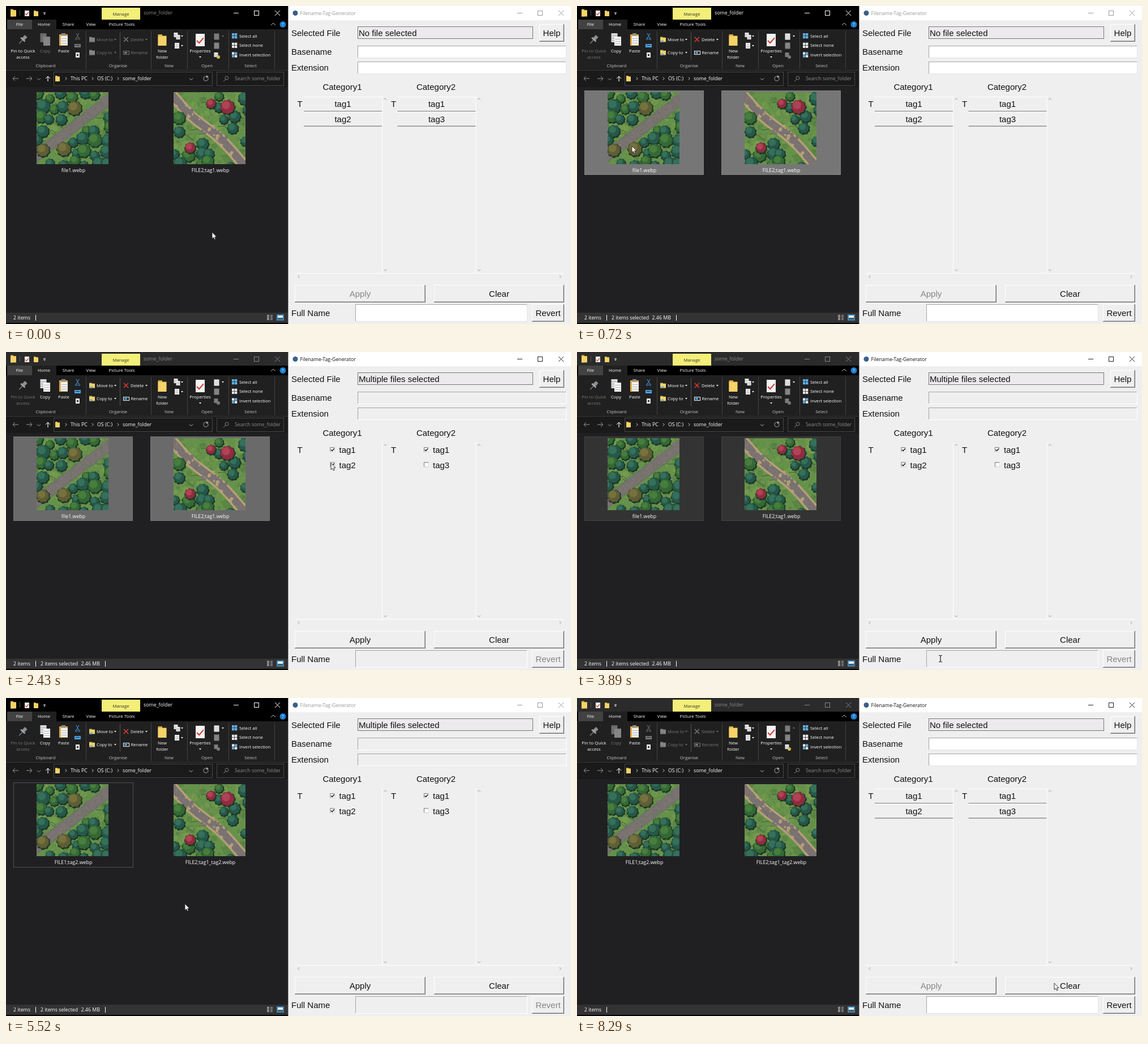
These frames come from a looping animation (998 by 561 pixels, 8320 ms). An HTML page with a canvas:

```html
<!DOCTYPE html>
<html lang="en">
<head>
<meta charset="utf-8">
<title>Filename-Tag-Generator</title>
<style>
html, body { margin: 0; width: 100%; height: 100%; overflow: hidden; background: #000; }
canvas { display: block; }
</style>
</head>
<body>
<canvas id="stage" width="998" height="561"></canvas>
<script>
const LOOP = 8320;
const UI = '"Open Sans", sans-serif', ARIAL = '"Liberation Sans", Arial, sans-serif';
// Moments of the story, in ms
const PRESS = 60, BAND_END = 650, DROP = 1730, TICK = 2370, APPLY = 4400, RENAME = 4790, DESELECT = 5440, CLEAR = 7720;
let g = document.getElementById('stage').getContext('2d');

// Drawing helpers
function rect(x, y, w, h, color) { g.fillStyle = color; g.fillRect(x, y, w, h); }
function frame(x, y, w, h, color) {
  g.strokeStyle = color; g.lineWidth = 1;
  g.strokeRect(Math.round(x) + .5, Math.round(y) + .5, Math.round(w) - 1, Math.round(h) - 1);
}
function trace(points) {
  g.beginPath();
  for (let i = 0; i < points.length; i += 2) g.lineTo(points[i], points[i + 1]);
}
function line(color, width, ...points) {
  g.strokeStyle = color; g.lineWidth = width;
  trace(points); g.stroke();
}
function poly(color, ...points) { g.fillStyle = color; trace(points); g.fill(); }
function disc(x, y, r, color) {
  g.fillStyle = color;
  g.beginPath(); g.arc(x, y, r, 0, 7); g.fill();
}
function ring(x, y, r, color, end = 7) {
  g.strokeStyle = color; g.lineWidth = 1;
  g.beginPath(); g.arc(x, y, r, -.3, end); g.stroke();
}
function cross(x, y, r, color, width = 1) {
  line(color, width, x - r, y - r, x + r, y + r);
  line(color, width, x + r, y - r, x - r, y + r);
}
const tick = (x, y, s, color, width) => line(color, width, x - s, y, x - s * .3, y + s * .7, x + s, y - s * .8);
// y is the middle of the capitals
function text(s, x, y, color = '#fff', size = 8.8, align = 'left', font = UI) {
  g.font = size + 'px ' + font;
  g.textAlign = align; g.fillStyle = color;
  g.fillText(s, x, y + size * .36);
}
const small = (s, x, y, color, align) => text(s, x, y, color, 7.75, align);
const caption = (s, x, y, color) => small(s, x, y, color, 'center');
const arial = (s, x, y, color = '#111', align = 'left') => text(s, x, y, color, 15, align, ARIAL);
function chevron(x, y, turns, size, color) {
  g.save(); g.translate(x, y); g.rotate(turns * Math.PI / 2);
  line(color, 1, -size / 2, -size, size / 2, 0, -size / 2, size);
  g.restore();
}
const caret = (x, y, color) => poly(color, x - 2, y - 1, x + 2, y - 1, x, y + 1.5);
function folder(x, y, w, h, color = '#f5d367', tab = '#d9a93c') {
  rect(x - w / 2, y - h / 2, w / 2, h, tab);
  rect(x - w / 2, y - h * .37, w, h * .87, color);
}
function page(x, y, w, h, color = '#f2f2f2') {
  rect(x - w / 2, y - h / 2, w, h, color);
  for (let i = 1; i < 4; i++) rect(x - w / 2 + 1, y - h / 2 + h * i / 4, w - 2, .6, '#8d8d8d');
}
function windowButtons(x, color) {
  line(color, 1, x - 4, 12.5, x + 5, 12.5);
  frame(x + 32, 8, 9, 9, color);
  cross(x + 73.5, 12.5, 4.5, color);
}

// Thumbnails: small forest maps with a road y = road(x)
function seeded(s) { return () => (s = s * 16807 % 2147483647) / 2147483647; }
const LEAVES = { teal: ['#26584a', '#35705a'], green: ['#346835', '#477d3d'], olive: ['#5f5d33', '#75723f'], red: ['#8f2c40', '#b04255'] };
function blob(x, y, r, color) {
  g.fillStyle = color; g.beginPath();
  for (let a = 0; a < 6.28; a += .16) {
    const q = r * (1 + .07 * Math.sin(a * 9 + x));
    g.lineTo(x + q * Math.cos(a), y + q * Math.sin(a));
  }
  g.fill();
}
function tree(x, y, r, kind) {
  const [dark, light] = LEAVES[kind];
  blob(x + .8, y + 1.2, r + 1.3, '#1b3527');
  blob(x, y, r, dark);
  blob(x - r * .2, y - r * .25, r * .6, light);
}
function makeMap({ seed, road, verge, density, accents }) {
  const canvas = document.createElement('canvas'), main = g, rnd = seeded(seed), spot = () => rnd() * 127;
  canvas.width = canvas.height = 127;
  g = canvas.getContext('2d');
  rect(0, 0, 127, 127, '#66914a');
  for (let i = 0; i < 90; i++) disc(spot(), spot(), 2 + rnd() * 6, i % 2 ? '#7ca24f80' : '#507a4080');
  for (let i = 0; i < 10; i++) {
    const x = spot(), y = spot();
    line('#3f5c35', 1, x, y, x + 12, y - 3 * rnd(), x + 22, y + 10 * rnd(), x + 34, y + 16 * rnd());
  }
  const route = [];
  for (let x = -8; x < 136; x += 4) route.push(x, road(x));
  line(verge, 20, ...route);
  line('#7b7272', 13, ...route);
  for (let i = 0; i < 45; i++) {
    const x = spot();
    disc(x, road(x) + (rnd() - .5) * 26, 1 + rnd() * 2.5, i % 2 ? verge : '#7b7272');
  }
  for (let i = 0; i < 400; i++) rect(spot(), spot(), 1, 1, i % 2 ? '#c0c07a70' : '#26382870');
  // jittered grid, kept clear of the road
  for (let row = 0; row < 7; row++) for (let col = 0; col < 7; col++) {
    const x = col * 20 + rnd() * 12, y = row * 20 + rnd() * 12, r = 7 + rnd() * 5, grows = rnd() < density;
    if (grows && Math.abs(y - road(x)) > 24) tree(x, y, r, rnd() < .75 ? 'teal' : 'green');
  }
  for (const [x, y, r, kind] of accents) tree(x, y, r, kind);
  g = main;
  return canvas;
}
const maps = [
  makeMap({ seed: 11, road: x => 112 - .77 * x, verge: '#6e7565', density: .95,
    accents: [[67, 28, 12, 'olive'], [48, 100, 12, 'olive'], [11, 102, 11, 'olive']] }),
  makeMap({ seed: 29, road: x => 8 + .95 * x + 4 * Math.sin(x / 18), verge: '#b5a077', density: .6,
    accents: [[66, 20, 8, 'red'], [95, 26, 12, 'red'], [29, 98, 9, 'red']] })
];

// Pointer stops: where, arrival, departure
const STOPS = [
  [364, 399, 0, PRESS], [97, 247, BAND_END, 870], [704, 352, 1650, DROP], [574, 196, TICK, 2840], [640, 246, 3230, 3530],
  [642, 541, 3860, 3950], [608, 503, 4340, RENAME], [316, 363, DESELECT, 6180], [843, 503, 7600, LOOP]
];
function pointerAt(t) {
  const i = STOPS.findIndex(stop => t <= stop[3]), [x, y, arrive] = STOPS[i];
  if (t >= arrive) return [x, y];
  const [x0, y0, , leave] = STOPS[i - 1], left = (1 - (t - leave) / (arrive - leave)) ** 2;
  return [x + (x0 - x) * left, y + (y0 - y) * left];
}

function drawRibbon(on) {
  const dim = '#777', lit = on ? '#fff' : dim, blue = on ? '#4aa3e8' : dim, red = on ? '#e03a32' : dim;
  rect(0, 41, 498, 73, '#202021');
  for (const x of [141, 256, 320, 393, 474]) rect(x, 44, 1, 67, '#434343');
  rect(201, 46, 1, 49, '#555');

  // Clipboard
  g.save(); g.translate(30, 59); g.rotate(.75);
  rect(-3, -8, 6, 8, '#8b8f92'); rect(-5, -1, 10, 2.5, '#a4a8ab'); rect(-.6, 1, 1.2, 9, '#8b8f92');
  g.restore();
  caption('Pin to Quick', 30, 79, on ? dim : '#fff'); caption('access', 30, 90, on ? dim : '#fff');
  page(66, 56, 11, 16, on ? '#d8dce0' : '#686868'); page(72, 62, 12, 16, on ? '#f4f4f4' : '#848484');
  caption('Copy', 69, 79, lit);
  rect(94, 50, 15, 20, '#dca94e'); rect(98, 48, 7, 4, '#8c8c8c'); page(103, 61, 12, 16);
  caption('Paste', 102, 79);
  line(blue, 1, 124, 48, 129, 57); line(blue, 1, 129, 48, 124, 57);
  ring(124, 58, 1.5, blue); ring(129, 58, 1.5, blue);
  rect(121, 67, 11, 6, blue); rect(123, 69, 7, 1, '#222');
  rect(123, 82, 7, 9, '#e8e8e8'); rect(125, 85, 3, 3, '#2d3338');

  // Organise
  ['Move to', 'Copy to'].forEach((label, i) => {
    const y = 59 + i * 23;
    folder(152, y, 10, 9, on ? '#f3d26a' : '#858585', on ? '#d9a93c' : dim);
    line(blue, 1.5, 147, y + 3, 153, y + 3); chevron(152, y + 3, 0, 2, blue);
    small(label, 160, y, lit); caret(193, y, lit);
  });
  cross(212, 59, 4, red, 1.6);
  small('Delete', 220, 59, lit); caret(248, 59, lit);
  frame(207, 79, 11, 7, lit); rect(209, 81, 5, 3, blue);
  small('Rename', 220.5, 82, lit);

  // New and Open
  folder(276, 60, 15, 20);
  caption('New', 276, 79); caption('folder', 276, 90);
  page(300, 51, 7, 8); page(304, 55, 7, 8); page(302, 70, 8, 10);
  caret(311, 53, '#fff'); caret(311, 70, '#fff');
  rect(335, 49, 16, 22, '#f4f4f4'); tick(343, 61, 6, '#d0392f', 2);
  caption('Properties', 343, 79); caret(343, 90, '#fff');
  page(372, 54, 9, 11, on ? '#f2f2f2' : dim); caret(383, 53, lit);
  page(372, 70, 9, 11, '#828282');
  page(371, 86, 7, 8, on ? dim : '#f2f2f2'); disc(375, 90, 3, on ? dim : '#d4bd4b');

  ['Select all', 'Select none', 'Invert selection'].forEach((label, i) => {
    const y = 53 + i * 16.7;
    for (let k = 0; k < 4; k++) {
      const filled = i === 0 || i === 2 && (k === 1 || k === 2);
      rect(399 + k % 2 * 5, y - 5 + (k >> 1) * 5, 4.3, 4.3, filled ? '#63b0e6' : '#e8e8e8');
    }
    small(label, 412, y);
  });
  Object.entries({ Clipboard: 70, Organise: 198, New: 288, Open: 355, Select: 432 })
    .forEach(([label, x]) => caption(label, x, 105, '#c4c4c4'));
}

function drawAddressBar() {
  rect(0, 113, 498, 30, '#1a1a1b'); rect(0, 113, 498, 1, '#363636');
  for (const [x, way] of [[17, -1], [41, 1]]) {
    line('#999', 1, x - 5, 128, x + 5, 128);
    chevron(x + way * 3, 128, way < 0 ? 2 : 0, 4, '#999');
  }
  chevron(58, 129, 1, 3, '#999');
  line('#fff', 1.2, 74, 133, 74, 124); chevron(74, 126, 3, 4, '#fff');
  frame(84, 116, 281, 25, '#474747'); frame(372, 116, 119, 25, '#474747');
  folder(91, 128, 8, 10);
  Object.entries({ 'This PC': 114, 'OS (C:)': 161, 'some_folder': 206 }).forEach(([label, x]) => {
    chevron(x - 8, 128, 0, 2.5, '#ccc');
    text(label, x, 128);
  });
  chevron(327, 129, 1, 3, '#bbb');
  ring(353, 128, 4, '#aaa', 5); poly('#aaa', 354, 122, 358, 125, 354, 127);
  ring(390, 127, 3, '#888'); line('#888', 1, 388, 129, 384, 133);
  text('Search some_folder', 404, 128, '#8c8c8c');
}

function drawFiles(t, px, py) {
  rect(0, 143, 498, 398, '#202022');
  const fade = Math.min(1, Math.max(0, (t - 2400) / 180)), shade = 118 - fade * 67;
  const names = t < RENAME ? ['file1.webp', 'FILE2;tag1.webp'] : ['FILE1;tag2.webp', 'FILE2;tag1_tag2.webp'];
  names.forEach((name, i) => {
    const x = 13 + i * 242, banded = py < 298 && px < x + 211;
    if (t < DESELECT && (banded || t >= BAND_END)) {
      rect(x, 149, 211, 149, `rgb(${shade},${shade},${shade})`);
      frame(x, 149, 211, 149, '#ffffff12');
    } else if (i === 0 && t >= DESELECT && t < CLEAR) frame(x, 149, 212, 150, '#515152');
    g.drawImage(maps[i], x + 41, 152);
    text(name, x + 106, 290, '#fff', 8.8, 'center');
  });
  if (t >= PRESS && t < BAND_END) {
    const [x0, y0] = STOPS[0];
    rect(px, py, x0 - px, y0 - py, '#0078d74d');
    frame(px, py, x0 - px, y0 - py, '#0078d7');
  }
}

function drawExplorer(t, px, py) {
  const active = t >= PRESS && t < TICK || t >= DESELECT && t < CLEAR;
  const lit = active || t < PRESS, ribbonOn = t >= BAND_END && t < 5640;
  rect(0, 0, 499, 561, '#000');
  rect(0, 0, 498, 24, lit ? '#000' : '#2b2b2b');
  folder(13, 12, 10, 13); rect(24, 7, 1, 10, '#555');
  rect(33, 8, 8, 10, '#f2f2f2'); tick(37, 13.5, 3, '#d0392f', 1.2);
  folder(53, 13, 8, 10);
  rect(66, 11, 4, 1, '#ddd'); caret(68, 14, '#ddd');
  rect(169, 3, 68, 21, '#f3ef78');
  caption('Manage', 203, 14, '#333');
  text('some_folder', 243, 12, active ? '#fff' : '#8a8a8a');
  windowButtons(406, lit ? '#fff' : '#858585');

  rect(2, 24, 44, 17, '#424242'); rect(46, 24, 43, 17, '#202021');
  Object.entries({ File: 24, Home: 67, Share: 110, View: 150, 'Picture Tools': 204.5 })
    .forEach(([label, x]) => caption(label, x, 32.5));
  chevron(472, 32, 3, 4, '#bbb');
  disc(489, 32.5, 5.5, '#1c7fd0'); caption('?', 489, 32.5);
  drawRibbon(ribbonOn);
  drawAddressBar();
  drawFiles(t, px, py);

  rect(0, 541, 498, 18, '#333334');
  text('2 items', 13, 550); rect(52, 545, 1, 10, '#fff');
  if (ribbonOn) {
    text('2 items selected', 61, 550); text('2.46 MB', 132.5, 550);
    rect(175, 545, 1, 10, '#fff');
  }
  for (let y = 545; y < 555; y += 2.5) { rect(461, y, 4, 1.3, '#ccc'); rect(467, y, 4, 1.3, '#999'); }
  rect(478, 544, 13, 11, '#3f85b7'); rect(480, 546, 9, 7, '#e9f2f5'); rect(480, 550, 9, 3, '#455d66');
}

function relief(x, y, w, h, top, bottom, fill) {
  rect(x, y, w, h, bottom);
  rect(x, y, w - 1, h - 1, top);
  rect(x + 1, y + 1, w - 2, h - 2, fill);
}
function button(x, y, w, h, label, color = '#111', pressed = false) {
  if (pressed) relief(x, y, w, h, '#777', '#fff', '#efeeef');
  else {
    relief(x, y, w, h, '#fff', '#717171', '#b0b0b0');
    rect(x + 1, y + 1, w - 3, h - 3, '#f0eff0');
  }
  arial(label, x + w / 2 + pressed, y + h / 2 + pressed, color, 'center');
}
const entry = (x, y, w, h, on) => relief(x, y, w, h, '#a3a3a3', on ? '#e4e4e4' : '#fff', on ? '#fff' : '#f0eff0');

function drawCategory(x, number, tags, loaded, ticked) {
  arial('Category' + number, x + 84, 143, '#111', 'center');
  arial('T', x + 9, 173, '#111', 'center');
  rect(x + 154, 159, 1, 312, '#fff');
  chevron(x + 160, 164, 3, 2.5, '#999'); chevron(x + 160, 466, 1, 2.5, '#999');
  tags.forEach((tag, row) => {
    const y = 160 + row * 26.3;
    if (loaded) {
      relief(x + 62.5, y + 8, 9, 9, '#777', '#ddd', '#fff');
      if (ticked(row)) tick(x + 67, y + 12.5, 2.8, '#111', 1.5);
      arial(tag, x + 78.5, y + 13);
    } else {
      rect(x + 16, y, 138, 1, '#fff'); rect(x + 16, y + 25, 138, 1.3, '#808080');
      arial(tag, x + 85, y + 13, '#111', 'center');
    }
  });
}

function drawTagger(t) {
  const active = t >= TICK && t < DESELECT || t >= CLEAR;
  const loaded = t >= DROP && t < CLEAR + 60, gray = '#858585';
  rect(498, 0, 500, 561, '#9a9a9a');
  rect(499, 0, 499, 561, '#f0eff0');
  rect(499, 0, 499, 25, '#fff');
  disc(511, 12.5, 4.5, '#3a5f88');
  text('Filename-Tag-Generator', 519.5, 13, active ? '#111' : '#999');
  windowButtons(907, active ? '#222' : '#999');

  arial('Selected File', 504, 47.5); arial('Basename', 504, 81); arial('Extension', 504, 109);
  rect(621, 36, 310, 22, '#eceaec'); frame(621, 36, 310, 22, '#777');
  arial(loaded ? 'Multiple files selected' : 'No file selected', 623, 47.5);
  button(942, 32, 44, 31, 'Help');
  entry(621, 70, 369, 22, !loaded); entry(621, 98, 369, 22, !loaded);

  drawCategory(510, 1, ['tag1', 'tag2'], loaded, row => row === 0 || t >= 2400);
  drawCategory(675.5, 2, ['tag1', 'tag3'], loaded, row => row === 0);
  rect(510, 471, 476, 1, '#fff');
  chevron(517, 477.5, 2, 2.5, '#999'); chevron(979, 477.5, 0, 2.5, '#999');

  button(510, 492, 231, 31, 'Apply', loaded ? '#111' : gray, t >= APPLY && t < APPLY + 190);
  button(756, 492, 230, 31, 'Clear', '#111', t >= CLEAR && t < CLEAR + 110);
  arial('Full Name', 504, 541.5);
  entry(617, 526, 304, 31, !loaded);
  button(929, 526, 57, 31, 'Revert', loaded ? gray : '#111');
}

function drawDragged(x, y) {
  g.globalAlpha = .7;
  g.drawImage(maps[1], x - 31, y - 70, 69, 69);
  g.drawImage(maps[0], x - 35, y - 66, 69, 69);
  g.globalAlpha = 1;
  rect(x - 8, y - 39, 15, 15, '#0078d7');
  text('2', x, y - 31.5, '#fff', 8.8, 'center');
}

function drawPointer(x, y) {
  const over = (x0, y0, x1, y1) => x > x0 && x < x1 && y > y0 && y < y1;
  if (over(617, 526, 921, 557) || over(621, 70, 990, 120)) {
    line('#111', 1.2, x, y - 5, x, y + 5);
    for (const d of [-6, 6]) line('#111', 1, x - 3, y + d, x, y + d * .85, x + 3, y + d);
    return;
  }
  g.save(); g.translate(x, y);
  poly('#fff', 0, 0, 0, 11.5, 2.6, 9.2, 4.4, 13, 6.3, 12.2, 4.6, 8.4, 8, 8.3, 0, 0);
  g.strokeStyle = '#222'; g.lineWidth = .9; g.stroke();
  g.restore();
}

function render() {
  const t = performance.now() % LOOP, [x, y] = pointerAt(t);
  drawExplorer(t, x, y);
  drawTagger(t);
  if (t >= 900 && t < DROP) drawDragged(x, y);
  drawPointer(x, y);
  requestAnimationFrame(render);
}
render();
</script>
</body>
</html>
```
